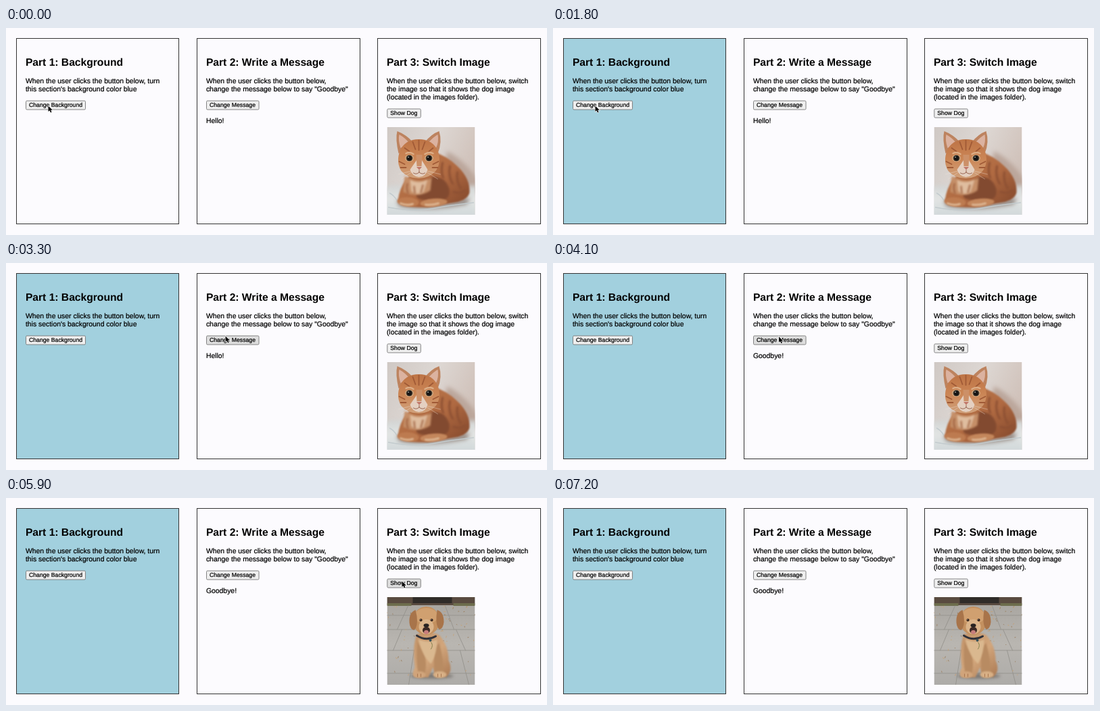
An HTML page with a canvas that plays this animation: 800 by 307 pixels, repeating every 7.3 s.

```html
<!DOCTYPE html>
<html lang="en">
<head>
<meta charset="utf-8">
<title>Three exercises</title>
<style>
  html, body { margin: 0; width: 100%; height: 100%; overflow: hidden; background: #fcfbfe; }
  canvas { display: block; width: 800px; height: 307px; }
</style>
</head>
<body>
<canvas id="stage" width="800" height="307"></canvas>
<script>
const ctx = document.getElementById('stage').getContext('2d');
const LOOP = 7300, BLUE_AT = 1700, GOODBYE_AT = 3600, DOG_AT = 5800, HIDE_AT = 6900;
const FONT = '"Liberation Sans", Arial, sans-serif';
// time, x, y of the pointer tip
const POINTER = [[0, 62, 115.5], [2400, 62, 115.5], [3200, 324, 108.5], [4000, 325, 109],
  [4900, 568, 115], [5400, 585, 123.5], [LOOP, 585, 123.5]];

function text(str, x, y, size = 10.42, weight = 'normal') {
  ctx.font = `${weight} ${size}px ${FONT}`;
  ctx.textRendering = 'geometricPrecision';
  ctx.fillStyle = ctx.strokeStyle = '#000';
  ctx.lineWidth = .22;
  ctx.fillText(str, x, y);
  if (weight === 'normal') ctx.strokeText(str, x, y);
}

function shape(color, d) {
  ctx.fillStyle = color;
  ctx.fill(new Path2D(d));
}

function line(color, width, d) {
  ctx.strokeStyle = color;
  ctx.lineWidth = width;
  ctx.stroke(new Path2D(d));
}

function oval(color, x, y, rx, ry = rx, turn = 0) {
  ctx.fillStyle = color;
  ctx.beginPath();
  ctx.ellipse(x, y, rx, ry, turn, 0, 7);
  ctx.fill();
}

function gradient(x0, y0, x1, y1, ...colors) {
  const g = ctx.createLinearGradient(x0, y0, x1, y1);
  colors.forEach((c, i) => g.addColorStop(i / (colors.length - 1), c));
  return g;
}

function soften(radius, draw) {
  ctx.filter = `blur(${radius}px)`;
  draw();
  ctx.filter = 'none';
}

function random(seed) {
  return () => (seed = seed * 16807 % 2147483647) / 2147483647;
}

function makePhoto(x, y, draw) {
  ctx.save();
  ctx.translate(x, y);
  ctx.beginPath();
  ctx.rect(0, 0, 130, 130);
  ctx.clip();
  ctx.lineCap = 'round';
  draw();
  ctx.restore();
}

function cat() {
  ctx.fillStyle = gradient(0, 0, 130, 60, '#cfc8c4', '#ddd7d3', '#cfc0b8');
  ctx.fillRect(0, 0, 130, 130);
  soften(3, () => {
    shape('#bba69b', 'M88 36Q112 46 134 78V98H84Z');
    shape(gradient(0, 82, 0, 130, '#cdd0d0', '#e2e4e3', '#d2d9db'),
      'M-5 90Q18 82 40 94L108 92Q122 84 135 88V135H-5Z');
    shape('#8c7f78', 'M14 108Q60 126 122 104L118 114Q60 126 18 117Z');
  });
  line('#c3cbce', 1.5, 'M2 119Q40 126 66 121T128 112M4 98Q10 101 14 108');

  soften(1, () => {
    shape(gradient(50, 40, 112, 112, '#b87448', '#b06a42', '#8a4d2f'),
      'M66 36Q88 42 104 58Q123 76 122 97Q119 110 94 113L60 119Q24 120 16 109Q18 91 28 78Z');
  });
  soften(1.5, () => {
    shape('#824a30', 'M66 74Q86 72 92 92Q94 106 82 108L54 108Q40 106 44 98Z');
    shape('#c58f68', 'M26 72Q46 86 66 75L64 94Q46 106 24 96Z');
    shape('#dfbd9f', 'M34 78Q46 85 60 78L54 96Q44 102 36 95Z');
    line('#8d5033', 3, 'M82 53Q79 66 83 75M93 58Q90 72 97 84M104 67Q102 80 109 91M98 96Q108 100 116 94');
    line('#9b5c3b', 2, 'M30 84Q28 91 31 98M40 88L41 98M53 86L50 97');
  });
  soften(.8, () => {
    oval('#bd7b50', 31, 111, 16, 7, .08);
    oval('#c4875c', 69, 112, 20, 6, -.08);
    line('#dcb592', 3, 'M20 113Q29 117 38 114M57 115Q67 116 76 113');
  });

  soften(.6, () => {
    shape('#bd835f', 'M17 39Q12 17 15 6Q28 11 38 22ZM56 22Q66 10 77 6Q82 22 75 39Z');
    shape('#dbb2a0', 'M20 31Q16 19 18 11Q27 16 33 24ZM61 23Q68 15 75 11Q77 22 72 32Z');
    shape(gradient(47, 18, 47, 77, '#bd7345', '#cb8656', '#d0a27d'),
      'M47 18Q67 18 75 35Q81 52 72 65Q62 76 47 76Q30 76 21 65Q13 52 19 35Q27 18 47 18Z');
    line('#a05a36', 1.8, 'M38 22L42 33M47 20V34M56 22L52 33M26 31L33 36M68 31L62 36M18 51L26 55M76 51L68 55M20 60L28 60M75 60L67 60');
    line('#dcae87', 2.5, 'M28 39Q34 36 39 40M56 40Q62 36 68 39');
    shape('#e4d0c1', 'M43 50L46 42H49L52 50L60 63Q57 74 47 74Q37 73 34 63Z');
    shape('#cc9068', 'M43 41H52L51 58H44Z');
  });
  for (const x of [33, 62]) {
    oval('#d9b58d', x, 46, 6.3, 5.3);
    oval('#54412f', x, 46, 5, 4.6);
    oval('#171615', x, 46, 3.5, 4);
    oval('#e4ece7', x - 1.4, 44.5, .8);
  }
  shape('#c1786a', 'M43.5 59H51.5L47.5 63.5Z');
  line('#8e5540', .9, 'M47.5 64V67Q43 71 39 68M47.5 67Q52 71 56 68');
  line('#efe2d8', .4, 'M36 65L17 70M36 67L21 77M59 65L79 70M59 67L75 77');
}

function dog() {
  const rnd = random(71);
  ctx.fillStyle = gradient(0, 10, 0, 130, '#a9a6a1', '#b9b6b1', '#adaba8');
  ctx.fillRect(0, 0, 130, 130);
  ctx.fillStyle = '#594b40';
  ctx.fillRect(0, 0, 130, 12);
  ctx.fillStyle = '#302c29';
  ctx.fillRect(38, 0, 58, 9);
  ctx.fillStyle = '#6d6d4d';
  ctx.fillRect(0, 9, 36, 4);
  ctx.fillRect(98, 9, 32, 4);
  line('#95928d', .9, 'M0 27H130M0 48H130M0 79H130M0 113H130M31 13L15 48M86 13L99 48M22 48L9 79M102 48L116 79M40 79L32 130M108 79L121 130');
  for (let i = 0; i < 85; i++) {
    const y = 14 + 110 * rnd() ** 1.5;
    oval(rnd() > .5 ? '#9b8064' : '#c3a27a', rnd() * 130, y, .6 + rnd() * 1.3, .5, rnd() * 3);
  }
  soften(2, () => oval('#7d7975', 66, 117, 32, 4));
  soften(.8, () => {
    shape(gradient(40, 60, 92, 115, '#c3946a', '#d2a67c', '#ae7d56'),
      'M44 55Q61 49 77 56Q91 72 91 94Q98 109 88 118L72 119L68 104L61 119H42Q35 115 41 105Q37 73 44 55Z');
    shape('#b88b62', 'M45 66Q42 91 46 113H56Q60 98 54 80ZM70 75Q68 92 71 116H84Q84 92 77 68Z');
    shape('#dab88f', 'M46 62Q60 69 74 63Q74 83 65 99Q52 87 46 62Z');
    oval('#d0a47b', 48, 115, 9, 5);
    oval('#d8b086', 78, 115, 10, 5);
  });
  line('#a5714b', .9, 'M45 114V118M50 114V118M75 114V118M80 114V118');
  line('#303139', 3, 'M44 57Q58 66 72 58');
  oval('#34515a', 64, 64, 2);
  line('#85814e', 1, 'M65 67Q69 71 65 77');
  soften(.6, () => {
    oval('#c3905f', 58, 35, 20, 21);
    oval('#d0a070', 58, 28, 17, 12);
    shape('#a8744a', 'M42 19Q32 23 33 38Q34 48 40 49Q46 44 44 28ZM74 19Q84 22 84 37Q83 47 77 48Q72 42 73 28Z');
    oval('#dbb48a', 58, 44, 11, 11);
  });
  oval('#3b2824', 58, 49, 5.5, 5);
  oval('#c77e7b', 58, 52, 3.5, 3);
  oval('#282322', 58, 42, 4, 2.8);
  oval('#30211b', 50, 34, 2.1);
  oval('#30211b', 66, 34, 2.1);
  oval('#e8e0d5', 49.4, 33.3, .5);
  oval('#e8e0d5', 65.4, 33.3, .5);
}

function panel(x, width, fill, title, lines) {
  ctx.fillStyle = fill;
  ctx.fillRect(x, 16, width, 274);
  ctx.strokeStyle = '#333';
  ctx.lineWidth = 1;
  ctx.strokeRect(x + .5, 15.5, width, 275);
  text(title, x + 13.9, 56, 15.63, 'bold');
  lines.forEach((s, i) => text(s, x + 13.9, 82 + 12.1 * i));
}

function button(label, x, y, w, hover) {
  ctx.fillStyle = hover ? '#dedede' : '#efefef';
  ctx.strokeStyle = '#767676';
  ctx.lineWidth = .9;
  ctx.beginPath();
  ctx.roundRect(x + .5, y + .5, w - 1, 13, 1.5);
  ctx.fill();
  ctx.stroke();
  text(label, x + 5, y + 9.9, 8.68);
}

function pointerAt(t) {
  const i = POINTER.findIndex(p => p[0] > t);
  const [t0, x0, y0] = POINTER[i - 1], [t1, x1, y1] = POINTER[i];
  const u = (t - t0) / (t1 - t0), e = u * u * (3 - 2 * u);
  return [x0 + (x1 - x0) * e, y0 + (y1 - y0) * e];
}

function pointer(x, y) {
  ctx.save();
  ctx.translate(x, y);
  const arrow = 'M.5 0V8.5L2.5 6.7L4 10L5.5 9.3L4.1 6.2H6.8Z';
  line('#fff', 1.2, arrow);
  shape('#000', arrow);
  ctx.restore();
}

function render(t) {
  const [px, py] = pointerAt(t), visible = t < HIDE_AT;
  const over = (x, y, w) => visible && px >= x && px < x + w && py >= y && py < y + 14;
  ctx.fillStyle = '#fcfbfe';
  ctx.fillRect(0, 0, 800, 307);

  panel(15, 240, t < BLUE_AT ? '#fcfbfe' : '#a2d0de', 'Part 1: Background',
    ['When the user clicks the button below, turn', "this section's background color blue"]);
  panel(282, 241, '#fcfbfe', 'Part 2: Write a Message',
    ['When the user clicks the button below,', 'change the message below to say "Goodbye"']);
  panel(549, 241, '#fcfbfe', 'Part 3: Switch Image',
    ['When the user clicks the button below, switch', 'the image so that it shows the dog image', '(located in the images folder).']);

  button('Change Background', 29, 107.5, 89, false);
  button('Change Message', 296, 107.5, 78.5, over(296, 107, 78));
  button('Show Dog', 563.3, 119.5, 50.5, over(563, 119, 50));
  text(t < GOODBYE_AT ? 'Hello!' : 'Goodbye!', 295.9, 141);
  makePhoto(563.5, 147, t < DOG_AT ? cat : dog);
  if (visible) pointer(px, py);
}

function tick() {
  render(performance.now() % LOOP);
  requestAnimationFrame(tick);
}
tick();
</script>
</body>
</html>
```
